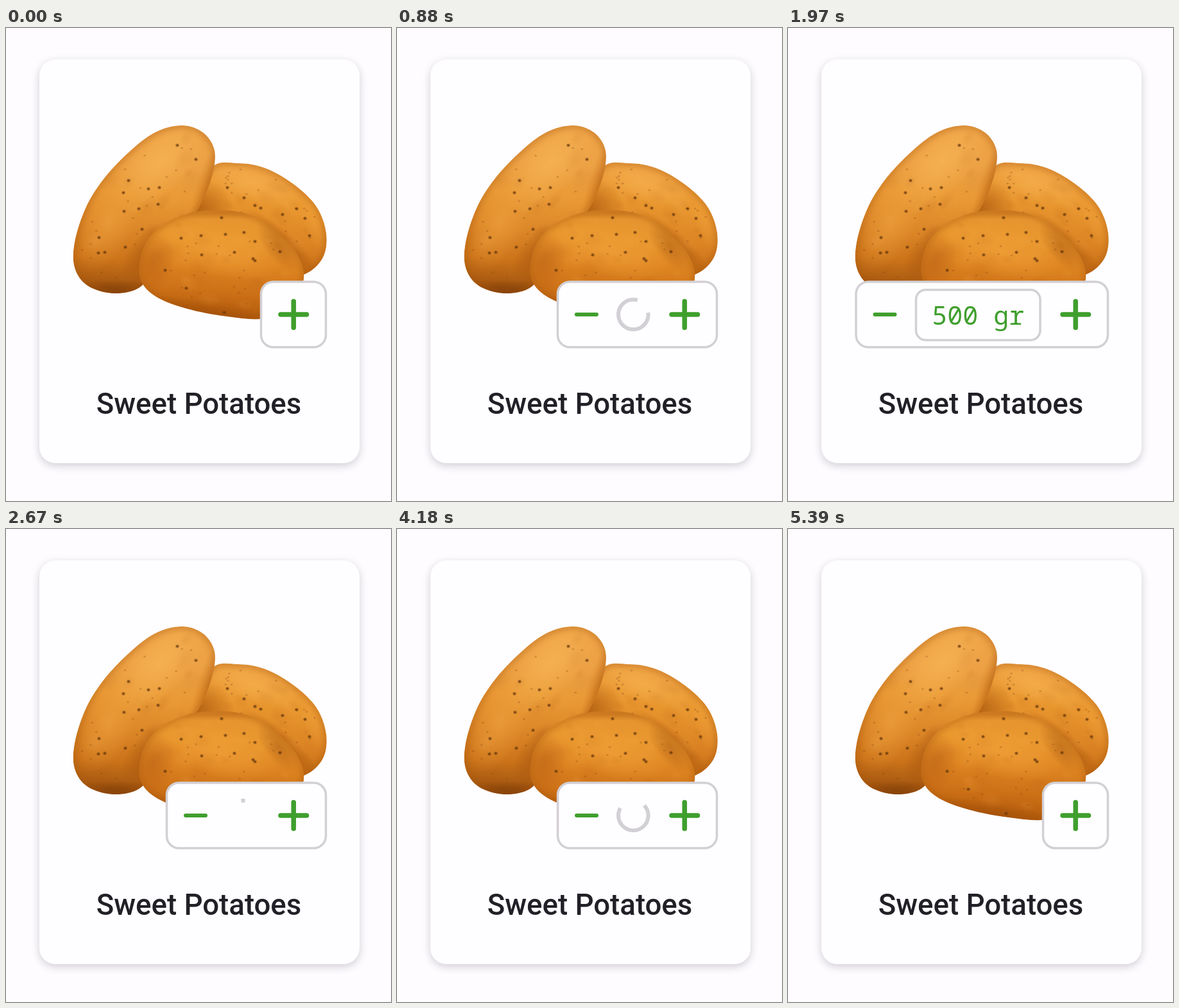
An HTML page with a canvas for the animation above (5.97 s loop, 600 by 738 pixels).

```html
<!DOCTYPE html>
<html lang="en">
<head>
<meta charset="utf-8">
<title>Quantity stepper</title>
<style>
html, body { margin: 0; width: 600px; height: 738px; overflow: hidden; background: #fefcff; }
canvas { display: block; }
</style>
</head>
<body>
<canvas id="stage" width="600" height="738"></canvas>
<script>
const LOOP = 5970;
const GREEN = '#3f9f2d', GREY = '#d2d0d5';
const RIGHT = 498.5, COLLAPSED = 397.5, LOADING = 250.5, OPEN = 106;
const ctx = document.getElementById('stage').getContext('2d');

// Left edge of the stepper: start, end, from, to
const MOVES = [
  [475, 570, COLLAPSED, LOADING], [880, 945, LOADING, OPEN],
  [1325, 1425, OPEN, LOADING], [1850, 1915, LOADING, OPEN],
  [2575, 2665, OPEN, LOADING], [3060, 3125, LOADING, OPEN],
  [3845, 3940, OPEN, LOADING], [4390, 4490, LOADING, COLLAPSED]
];
const SPINS = [[490, 945], [1440, 1915], [2660, 3125], [3945, 4490]];

const clamp = (v) => Math.max(0, Math.min(1, v));
const smooth = (p) => p * p * (3 - 2 * p);

// Eased curve of cubic-bezier(.2, 0, 0, 1)
function emphasized(x) {
  let lo = 0, hi = 1;
  for (let i = 0; i < 20; i++) {
    const s = (lo + hi) / 2;
    if (0.6 * s * (1 - s) ** 2 + s ** 3 < x) lo = s; else hi = s;
  }
  return lo * lo * (3 - 2 * lo);
}

function random(seed) {
  return () => (seed = (seed * 16807) % 2147483647) / 2147483647;
}

function closedCurve(points) {
  const path = new Path2D(), n = points.length;
  const at = (i) => points[(i + n) % n];
  path.moveTo(...points[0]);
  for (let i = 0; i < n; i++) {
    const [a, b, c, d] = [at(i - 1), at(i), at(i + 1), at(i + 2)];
    path.bezierCurveTo(
      b[0] + (c[0] - a[0]) / 6, b[1] + (c[1] - a[1]) / 6,
      c[0] - (d[0] - b[0]) / 6, c[1] - (d[1] - b[1]) / 6, c[0], c[1]);
  }
  path.closePath();
  return path;
}

function glow(g, x, y, rx, ry, angle, rgb, alpha) {
  g.save();
  g.translate(x, y);
  g.rotate(angle);
  g.scale(rx, ry);
  const fill = g.createRadialGradient(0, 0, 0, 0, 0, 1);
  fill.addColorStop(0, `rgba(${rgb},${alpha})`);
  fill.addColorStop(0.5, `rgba(${rgb},${alpha * 0.55})`);
  fill.addColorStop(1, `rgba(${rgb},0)`);
  g.fillStyle = fill;
  g.fillRect(-1, -1, 2, 2);
  g.restore();
}

function potato(g, { outline, axis, tones, glows, center, size, angle, seed, spots }) {
  const path = closedCurve(outline);
  const base = g.createLinearGradient(...axis);
  tones.forEach((tone, i) => base.addColorStop(i / (tones.length - 1), tone));
  g.save();
  g.clip(path);
  g.fillStyle = base;
  g.fill(path);
  glows.forEach((item) => glow(g, ...item));

  const rnd = random(seed), cos = Math.cos(angle), sin = Math.sin(angle);
  const place = () => {
    const r = Math.sqrt(rnd()) * 0.9, a = rnd() * Math.PI * 2;
    const u = Math.cos(a) * r * size[0], v = Math.sin(a) * r * size[1];
    return [center[0] + u * cos - v * sin, center[1] + u * sin + v * cos];
  };
  for (let i = 0; i < 26; i++) {
    const r = 8 + rnd() * 14;
    glow(g, ...place(), r, r * 0.7, angle, i % 2 ? '246,177,82' : '177,91,20', 0.11);
  }
  for (let i = 0; i < 22; i++) glow(g, ...place(), 2.6, 2.1, 0, '130,66,14', 0.4);
  spots.forEach(([x, y]) => glow(g, x, y, 3.6, 3.2, 0, '92,46,8', 0.95));

  g.filter = 'blur(5px)';
  g.lineWidth = 7;
  g.strokeStyle = 'rgba(166,84,10,.5)';
  g.stroke(path);
  g.restore();
}

function drawPotatoes(g) {
  potato(g, {
    outline: [[320, 218], [362, 211], [405, 219], [450, 245], [484, 279], [499, 320],
      [494, 358], [466, 384], [420, 390], [340, 340], [292, 284]],
    axis: [410, 215, 385, 390], tones: ['#efa345', '#e9972f', '#d98122', '#b9620f'],
    glows: [[385, 243, 80, 28, 0.35, '250,184,85', 0.5], [300, 280, 55, 45, 0, '158,75,8', 0.6],
      [425, 335, 80, 22, 0.7, '160,77,8', 0.65], [482, 300, 20, 50, -0.3, '244,166,64', 0.4]],
    center: [410, 280], size: [95, 55], angle: 0.55, seed: 31,
    spots: [[388, 277], [397, 281], [371, 265], [466, 297], [453, 282], [431, 291], [345, 249], [473, 324]]
  });
  potato(g, {
    outline: [[274, 152], [307, 163], [325, 191], [321, 231], [301, 280], [270, 320], [235, 370],
      [208, 405], [167, 414], [127, 402], [107, 374], [107, 334], [124, 281], [151, 237], [190, 195], [232, 163]],
    axis: [205, 205, 190, 414], tones: ['#eda246', '#ea9a36', '#dd8829', '#cc741a', '#9c500d'],
    glows: [[240, 210, 95, 45, -0.85, '250,187,91', 0.55], [160, 310, 75, 38, -1.1, '245,168,67', 0.45],
      [228, 350, 62, 34, -0.8, '158,77,10', 0.65], [170, 416, 75, 24, 0, '113,53,7', 0.7],
      [318, 245, 22, 70, 0.3, '190,98,16', 0.5]],
    center: [212, 280], size: [145, 77], angle: -0.93, seed: 77,
    spots: [[267, 183], [222, 251], [207, 282], [184, 286], [237, 275], [239, 249], [191, 238],
      [154, 350], [145, 327], [186, 342], [212, 314], [183, 257], [296, 205], [144, 351]]
  });
  potato(g, {
    outline: [[208, 367], [219, 333], [246, 306], [285, 289], [330, 284], [372, 289], [408, 306],
      [438, 333], [458, 361], [464, 392], [448, 428], [405, 453], [344, 450], [282, 438], [235, 420], [211, 396]],
    axis: [335, 285, 325, 452], tones: ['#e59430', '#e9972e', '#dd8421', '#cd7117', '#b15a0b'],
    glows: [[335, 350, 95, 38, 0.25, '247,169,65', 0.5], [228, 365, 35, 48, 0.2, '177,89,20', 0.5],
      [425, 340, 48, 22, 0.9, '166,85,17', 0.5], [310, 445, 115, 22, 0.14, '153,72,8', 0.5],
      [335, 289, 85, 10, 0, '184,99,20', 0.4]],
    center: [333, 367], size: [119, 73], angle: 0.2, seed: 105,
    spots: [[273, 328], [304, 324], [342, 322], [388, 333], [385, 360], [388, 363], [356, 350],
      [336, 296], [305, 354], [248, 378], [281, 406], [371, 319], [427, 349], [340, 444]]
  });
}

function drawCard(g) {
  g.fillStyle = '#fefcff';
  g.fillRect(0, 0, 600, 738);
  g.save();
  g.shadowColor = 'rgba(30,25,40,.2)';
  g.shadowBlur = 13;
  g.shadowOffsetY = 4;
  g.fillStyle = '#fefdff';
  g.beginPath();
  g.roundRect(52, 49, 499, 630, 25);
  g.fill();
  g.restore();
  drawPotatoes(g);
  g.fillStyle = '#222027';
  g.font = '500 45.5px Roboto, sans-serif';
  g.textAlign = 'center';
  g.fillText('Sweet Potatoes', 300.5, 602);
}

const card = document.createElement('canvas');
card.width = 600;
card.height = 738;
drawCard(card.getContext('2d'));

function leftEdge(t) {
  let left = COLLAPSED;
  for (const [start, end, from, to] of MOVES) {
    if (t >= start) left = from + (to - from) * smooth(clamp((t - start) / (end - start)));
  }
  return left;
}

function frame(x, y, w, h, r) {
  ctx.beginPath();
  ctx.roundRect(x, y, w, h, r);
}

function line(x1, y1, x2, y2, width) {
  ctx.strokeStyle = GREEN;
  ctx.lineWidth = width;
  ctx.lineCap = 'round';
  ctx.beginPath();
  ctx.moveTo(x1, y1);
  ctx.lineTo(x2, y2);
  ctx.stroke();
}

function drawSpinner(t) {
  const start = -97 + 0.23 * t;
  const sweep = 14 + 290 * emphasized(clamp(t / 560));
  const rad = Math.PI / 180;
  ctx.lineCap = 'butt';
  ctx.lineWidth = 6;
  ctx.strokeStyle = GREY;
  ctx.beginPath();
  ctx.arc(368.3, 447, 23.3, start * rad, (start + sweep) * rad);
  ctx.stroke();
}

function drawValue(left, label) {
  const x = left + 93.5, w = 393 - x;
  frame(x, 408.5, w, 78.5, 15);
  ctx.strokeStyle = GREY;
  ctx.lineWidth = 3.5;
  ctx.stroke();
  ctx.save();
  ctx.clip();
  ctx.fillStyle = GREEN;
  ctx.font = '500 40px "Noto Sans Mono", monospace';
  ctx.textAlign = 'center';
  ctx.fillText(label, x + w / 2, 463);
  ctx.restore();
}

function draw(t) {
  ctx.drawImage(card, 0, 0);
  const left = leftEdge(t);
  const opened = clamp((LOADING - left) / (LOADING - OPEN));
  const shown = clamp((COLLAPSED - left) / (COLLAPSED - LOADING));

  frame(left, 396, RIGHT - left, 102, 19);
  ctx.fillStyle = '#fefdff';
  ctx.fill();
  ctx.save();
  ctx.clip();
  ctx.globalAlpha = shown;
  line(left + 29.5, 447, left + 60.5, 447, 6);
  const spin = SPINS.find(([start, end]) => t >= start && t < end);
  if (spin) {
    ctx.globalAlpha = shown * (1 - opened);
    drawSpinner(t - spin[0]);
  }
  if (opened > 0) {
    ctx.globalAlpha = opened;
    drawValue(left, t > 1600 && t < 2800 ? '500 gr' : '250 gr');
  }
  ctx.restore();

  line(428, 447, 468.5, 447, 7.5);
  line(448.2, 426.5, 448.2, 467.5, 7.5);
  frame(left, 396, RIGHT - left, 102, 19);
  ctx.strokeStyle = GREY;
  ctx.lineWidth = 3.5;
  ctx.stroke();
}

const began = performance.now();
function tick() {
  draw((performance.now() - began) % LOOP);
  requestAnimationFrame(tick);
}
tick();
</script>
</body>
</html>
```
